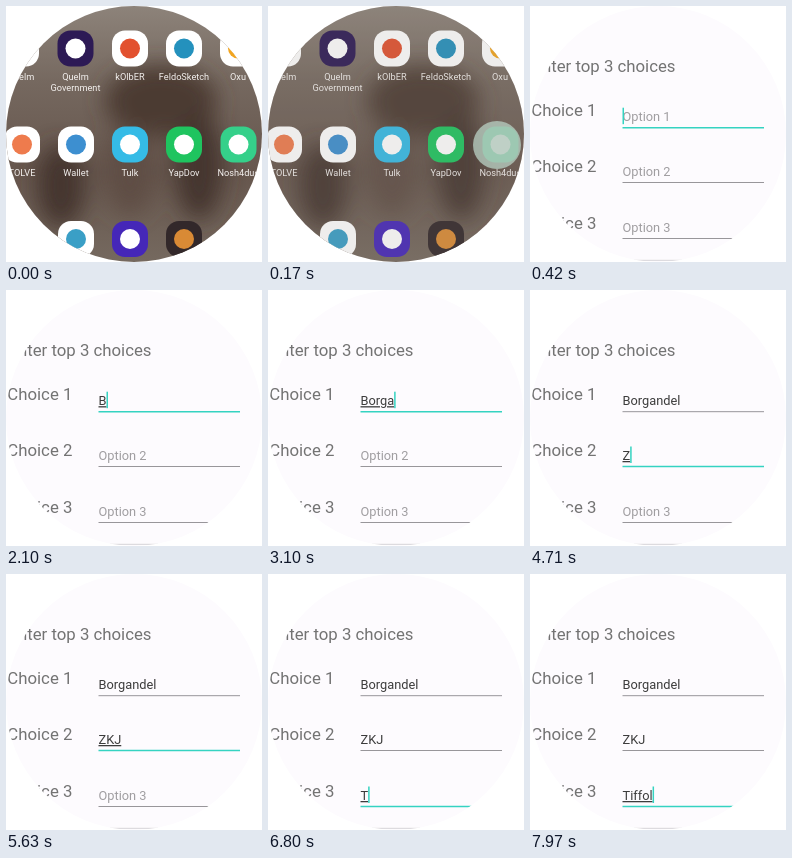
Animation of 256 by 256 pixels, one loop 8000 ms. Source, as an HTML page:

```html
<!DOCTYPE html>
<html lang="en">
<head>
<meta charset="utf-8">
<title>Top choices form</title>
<style>
  html, body { margin: 0; width: 100%; height: 100%; overflow: hidden; background: #fff; }
  svg { display: block; width: 100vw; height: 100vh; font-family: Roboto, sans-serif; }
  .app { font-size: 9.2px; fill: #f4f1ef; text-anchor: middle; }
  .label { font-size: 16.8px; fill: #737373; }
  .value { font-size: 12.8px; }
</style>
</head>
<body>
<svg id="stage" viewBox="0 0 256 256">
  <defs>
    <clipPath id="round"><circle cx="128" cy="128" r="128"/></clipPath>
    <filter id="soft" x="-60%" y="-60%" width="220%" height="220%"><feGaussianBlur stdDeviation="11"/></filter>
    <linearGradient id="wall" x1="0" y1="0" x2="0" y2="1">
      <stop offset="0" stop-color="#8d837a"/>
      <stop offset=".3" stop-color="#75685f"/>
      <stop offset=".65" stop-color="#66564d"/>
      <stop offset="1" stop-color="#75695f"/>
    </linearGradient>
  </defs>
  <g clip-path="url(#round)">
    <g id="home">
      <rect width="256" height="256" fill="url(#wall)"/>
      <g filter="url(#soft)">
        <ellipse cx="155" cy="95" rx="56" ry="36" fill="#4b3a32"/>
        <ellipse cx="55" cy="180" rx="24" ry="42" fill="#44352f"/>
        <ellipse cx="193" cy="160" rx="24" ry="54" fill="#44352f"/>
        <ellipse cx="124" cy="165" rx="24" ry="44" fill="#5f4d44"/>
      </g>
    </g>
    <g id="form">
      <rect width="256" height="256" fill="#fdfbfe"/>
      <text class="label" x="145.5" y="66" text-anchor="end">Enter top 3 choices</text>
      <path d="M104 254.3H152" stroke="#d6d4d7"/>
    </g>
  </g>
</svg>
<script>
const LOOP = 8000, TEAL = '#35d3c1';
const $ = id => document.getElementById(id);

function add(parent, tag, attrs, text) {
  const el = document.createElementNS('http://www.w3.org/2000/svg', tag);
  for (const k in attrs) el.setAttribute(k, attrs[k]);
  if (text) el.textContent = text;
  parent.append(el);
  return el;
}
const set = (el, attrs) => { for (const k in attrs) el.setAttribute(k, attrs[k]); };
const ramp = (t, a, b) => Math.min(1, Math.max(0, (t - a) / (b - a)));

// x, y, tile colour, mark colour, label lines
const apps = [
  [15, 42.5, '#fff', '#d9d9d9', 'Quelm'],
  [69.5, 42.5, '#2d1a55', '#fff', 'Quelm', 'Government'],
  [124, 42.5, '#fff', '#e2512f', 'kOlbER'],
  [178, 42.5, '#fff', '#2491bd', 'FeldoSketch'],
  [232, 42.5, '#fff', '#f2a51f', 'Oxu'],
  [16, 138.5, '#fff', '#ee7b4d', 'TOLVE'],
  [70, 138.5, '#fff', '#3d8fd0', 'Wallet'],
  [124, 138.5, '#35bbe6', '#fff', 'Tulk'],
  [178, 138.5, '#1fc45f', '#fff', 'YapDov'],
  [232.5, 138.5, '#35d08a', '#fff', 'Nosh4duo'],
  [70, 233, '#fff', '#3a9fc6'],
  [124, 233, '#4527b8', '#fff'],
  [178, 233, '#32282a', '#d98a35']
];
for (const [x, y, tile, mark, ...lines] of apps) {
  add($('home'), 'rect', { x: x - 18, y: y - 18, width: 36, height: 36, rx: 13, fill: tile });
  add($('home'), 'circle', { cx: x, cy: y, r: 10, fill: mark });
  lines.forEach((s, i) => add($('home'), 'text', { class: 'app', x, y: y + 31.5 + i * 10.5 }, s));
}
const dim = add($('home'), 'rect', { width: 256, height: 256, fill: '#8a8580' });
const press = add($('home'), 'circle', { cx: 229, cy: 139, fill: '#b4cabd' });

// Focus span and the time of each typed letter
const fields = [
  { y: 121.7, from: 260, to: 4000, word: 'Borgandel',
    keys: [2020, 2440, 2610, 2780, 2950, 3110, 3270, 3440, 3610] },
  { y: 176.5, from: 3930, to: 5840, word: 'ZKJ', keys: [4540, 4790, 5040] },
  { y: 232.5, from: 5800, to: Infinity, word: 'Tiffol',
    keys: [6630, 6960, 7210, 7380, 7800, 7960] }
];
const labelY = [110, 166, 222.5];
fields.forEach((f, i) => {
  const g = $('form');
  add(g, 'text', { class: 'label', x: 1.3, y: labelY[i] }, 'Choice ' + (i + 1));
  f.line = add(g, 'path', { d: `M92.5 ${f.y}H234` });
  f.text = add(g, 'text', { class: 'value', x: 92.5, y: f.y - 6.5 });
  f.caret = add(g, 'rect', { y: f.y - 20, width: 1.5, height: 16.5, fill: TEAL });
});

const taps = [[181, 167, 3860, 4080], [178, 222, 5710, 5900]].map(([cx, cy, from, to]) => ({
  from, to,
  el: add($('form'), 'circle', { cx, cy, r: 8, fill: '#fff', 'fill-opacity': .6, stroke: '#cfcdd0', 'stroke-width': 1.3 })
}));

function drawField(f, i, t) {
  const active = t >= f.from && t < f.to;
  const n = f.keys.filter(k => t >= k).length;
  const leaving = t > f.to - 140;
  const shown = n ? f.word.slice(0, n) : 'Option ' + (i + 1);
  if (f.text.textContent !== shown) f.text.textContent = shown;
  set(f.text, {
    fill: n ? '#3c3c3c' : '#a09ea1',
    'text-decoration': n && active && !leaving ? 'underline' : 'none'
  });
  set(f.line, { stroke: active ? TEAL : '#98969a', 'stroke-width': active ? 1.6 : 1 });
  const since = t - (n ? f.keys[n - 1] : f.from);
  const on = active && !leaving && since % 1000 < 500;
  const x = 92.5 + (n ? f.text.getComputedTextLength() : 0);
  set(f.caret, { x, opacity: on ? 1 : 0 });
}

function draw(t) {
  const p = ramp(t, 80, 170), open = ramp(t, 200, 335);
  set(dim, { opacity: .15 * p });
  set(press, { r: 16 + 8 * p, opacity: .8 * p });
  set($('home'), { visibility: open < 1 ? 'visible' : 'hidden' });
  set($('form'), { opacity: open });
  fields.forEach((f, i) => drawField(f, i, t));
  for (const { el, from, to } of taps)
    set(el, { opacity: ramp(t, from, from + 40) * (1 - ramp(t, to - 60, to)) });
}

const start = performance.now();
function tick() {
  draw((performance.now() - start) % LOOP);
  requestAnimationFrame(tick);
}
draw(0);
requestAnimationFrame(tick);
</script>
</body>
</html>
```
